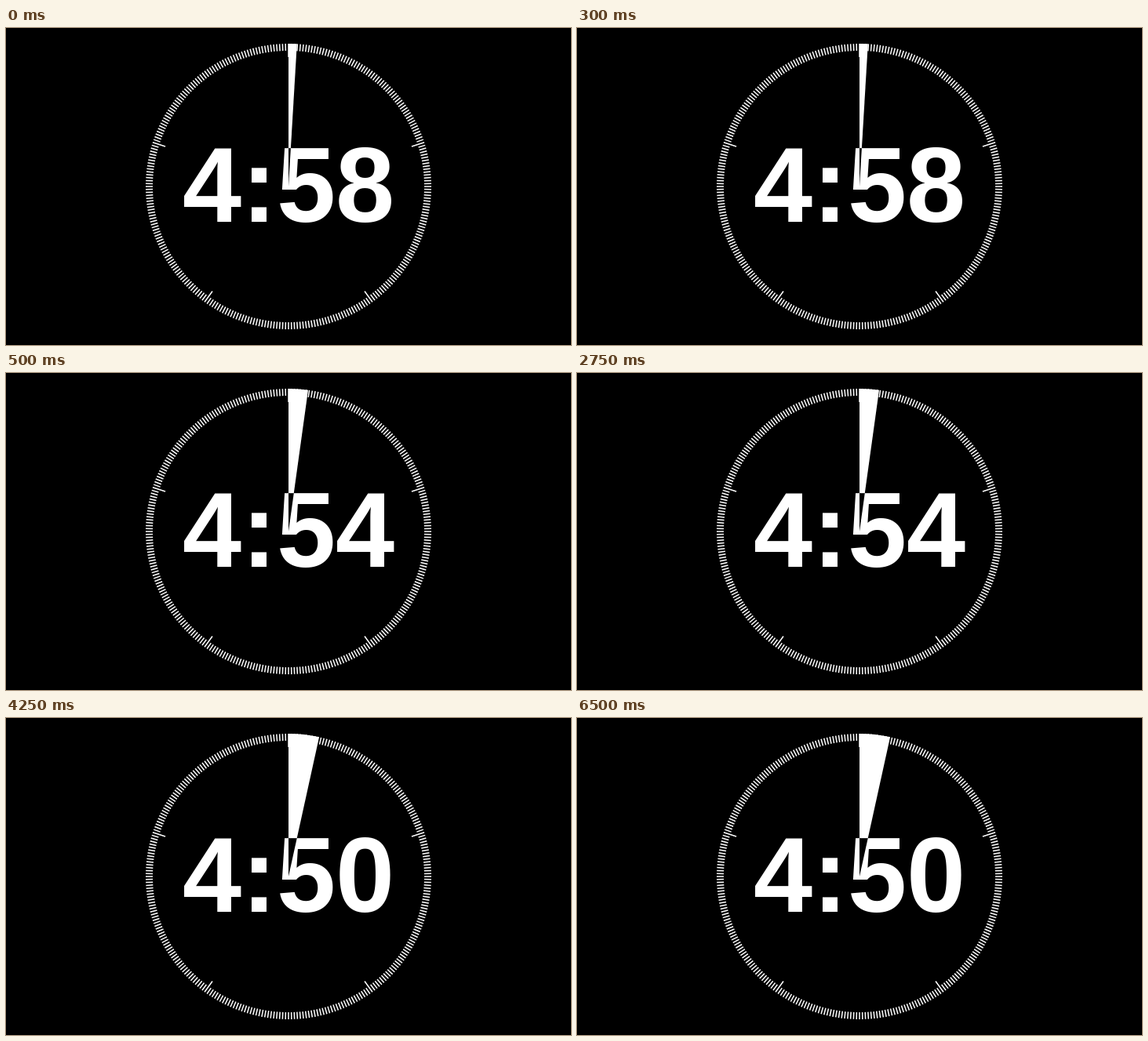
An HTML page with a canvas that plays this animation: 720x404 px, repeating every 8 s.

```html
<!DOCTYPE html>
<html lang="en">
<head>
<meta charset="utf-8">
<title>Countdown</title>
<style>
  html, body { margin: 0; width: 100%; height: 100%; overflow: hidden; background: #000; }
  canvas { display: block; width: 720px; height: 404px; }
</style>
</head>
<body>
<canvas id="stage" width="720" height="404"></canvas>
<script>
const ctx = document.getElementById('stage').getContext('2d');
const LOOP = 8000, FIRST = 500, STEP = 3750;
const TOTAL = 300, START = 2.83;
const CX = 360, CY = 202, R = 182;

// The clock is only redrawn every STEP ms, so time advances in jumps.
function elapsedAt(ms) {
  const n = ms < FIRST ? 0 : 1 + Math.floor((ms - FIRST) / STEP);
  return START + n * STEP / 1000;
}

function drawTime(left) {
  const s = Math.ceil(left);
  const label = Math.floor(s / 60) + ':' + String(s % 60).padStart(2, '0');
  ctx.font = 'bold 135px "Liberation Sans", Arial, sans-serif';
  ctx.textAlign = 'center';
  ctx.textBaseline = 'alphabetic';
  ctx.fillText(label, CX, 246.8);
}

// Inverts whatever lies beneath it.
function drawSector(part) {
  const top = -Math.PI / 2;
  ctx.globalCompositeOperation = 'difference';
  ctx.beginPath();
  ctx.moveTo(CX, CY);
  ctx.arc(CX, CY, R, top, top + part * 2 * Math.PI);
  ctx.closePath();
  ctx.fill();
  ctx.globalCompositeOperation = 'source-over';
}

function drawTicks() {
  ctx.lineWidth = 1.5;
  ctx.beginPath();
  for (let i = 0; i < TOTAL; i++) {
    const a = i / TOTAL * 2 * Math.PI;
    const inner = R - (i % 60 ? 9 : 17);
    const x = Math.sin(a), y = -Math.cos(a);
    ctx.moveTo(CX + x * inner, CY + y * inner);
    ctx.lineTo(CX + x * R, CY + y * R);
  }
  ctx.stroke();
}

function draw(ms) {
  const elapsed = elapsedAt(ms);
  ctx.fillStyle = '#000';
  ctx.fillRect(0, 0, 720, 404);
  ctx.fillStyle = ctx.strokeStyle = '#fff';
  drawTime(TOTAL - elapsed);
  drawSector(elapsed / TOTAL);
  drawTicks();
}

const origin = performance.now();
function frame() {
  draw((performance.now() - origin) % LOOP);
  requestAnimationFrame(frame);
}
frame();
</script>
</body>
</html>
```
